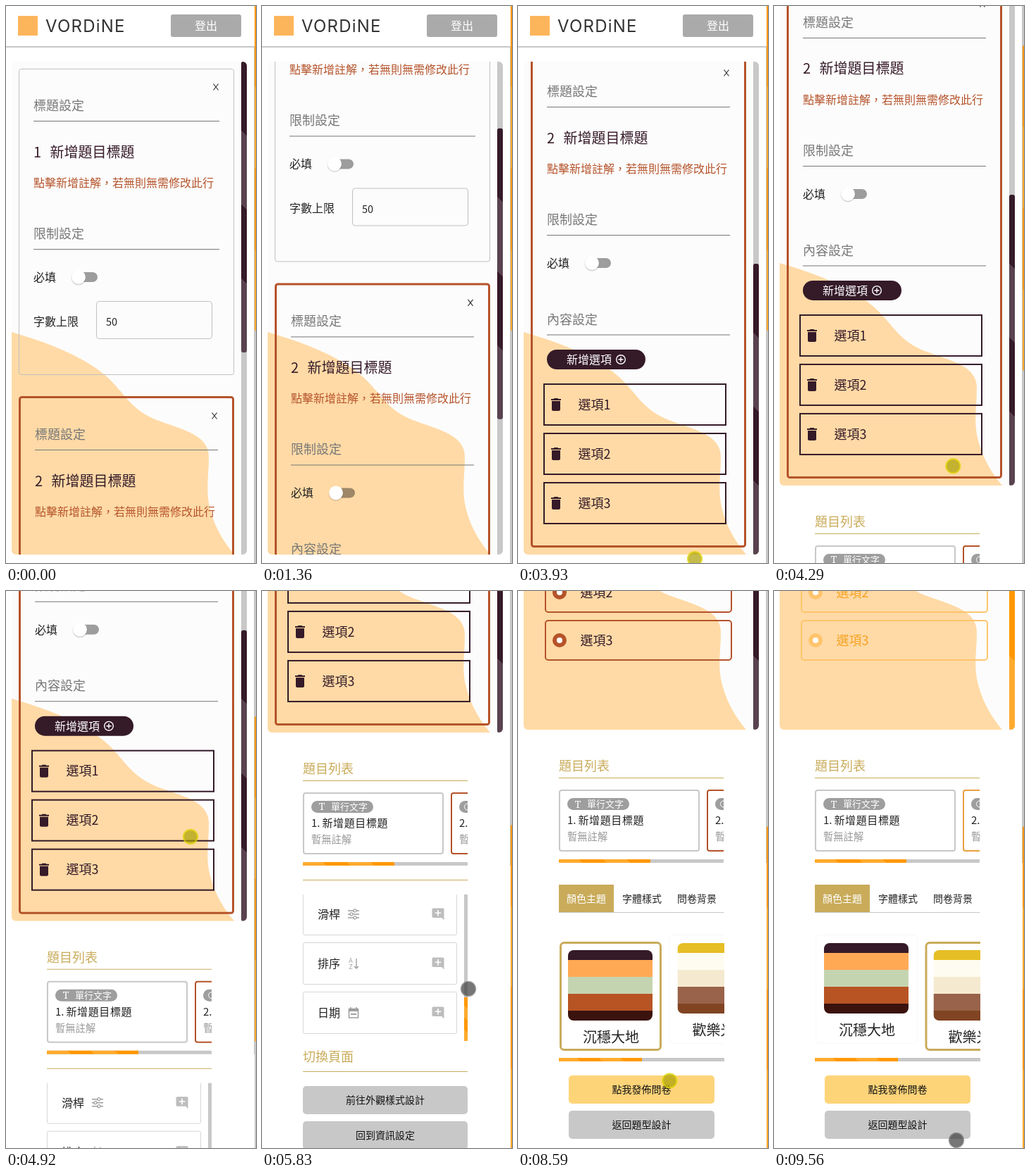
Animation of 355x791 px, one loop 9620 ms. Source, as an HTML page:

```html
<!DOCTYPE html>
<html lang="zh-Hant">
<head>
<meta charset="utf-8">
<title>問卷編輯</title>
<style>
html, body { margin: 0; width: 100%; height: 100%; overflow: hidden; background: #fff; }
svg { display: block; width: 355px; height: 791px; --main: #351a28; --edge: #b5532a; --opt: #b5532a; --label: #351a28; }
text { font-family: "Noto Sans CJK TC", "Noto Sans CJK", "Noto Sans", sans-serif; white-space: pre; }
</style>
</head>
<body>
<svg id="stage" viewBox="0 0 355 791"></svg>
<script>
const LOOP = 9620;
const DARK = '#351a28', BROWN = '#b5532a', GOLD = '#c9ab5a', GRAY = '#c8c8c8', ORANGE = '#ff9800', MID = '#777';
const stage = document.getElementById('stage');
const $ = id => document.getElementById(id);

// Shape helpers; text is placed by its vertical centre.
const rect = (x, y, w, h, fill, r = 0, more = '') =>
  `<rect x="${x}" y="${y}" width="${w}" height="${h}" rx="${r}" fill="${fill}" ${more}/>`;
const frame = (x, y, w, h, color, sw = 1, r = 0, fill = 'none') =>
  rect(x + sw / 2, y + sw / 2, w - sw, h - sw, fill, r, `stroke="${color}" stroke-width="${sw}"`);
const text = (x, cy, str, size, fill = '#222', more = '') =>
  `<text x="${x}" y="${cy + size * 0.375}" font-size="${size}" fill="${fill}" ${more}>${str}</text>`;
const mid = (x, cy, str, size, fill, more = '') => text(x, cy, str, size, fill, 'text-anchor="middle" ' + more);
const path = (d, stroke, sw = 1.4) => `<path d="${d}" fill="none" stroke="${stroke}" stroke-width="${sw}"/>`;
const hline = (x1, x2, y, color) => rect(x1, y, x2 - x1, 1, color);
const clip = (id, x, y, w, h, r = 0) => `<clipPath id="${id}">${rect(x, y, w, h, '#000', r)}</clipPath>`;
const clipped = (id, body) => `<g clip-path="url(#${id})">${body}</g>`;
const group = (id, body) => `<g id="${id}">${body}</g>`;

// Scrollbar thumb with four 45 degree stripes.
let thumbs = 0;
function thumb(x, y, w, h, fill, r = 0) {
  const id = 'stripe' + thumbs++, len = (w + h) / 2;
  const stops = [0, 1, 2, 3].map(i => [i, i + 1].map(k =>
    `<stop offset="${k / 4}" stop-color="#fff" stop-opacity="${i % 2 ? 0 : 0.18}"/>`).join('')).join('');
  return `<linearGradient id="${id}" gradientUnits="userSpaceOnUse" x1="${x}" y1="${y + h}" x2="${x + len}" y2="${y + h - len}">${stops}</linearGradient>`
    + rect(x, y, w, h, fill, r) + rect(x, y, w, h, `url(#${id})`, r);
}

const cross = (x, y) => path(`M${x - 3.5} ${y - 4.5}l7 9m0 -9l-7 9`, '#333', 1.2);
const trash = (x, y) => `<path transform="translate(${x - 12} ${y - 12})" fill="${DARK}" d="M6 19c0 1.1.9 2 2 2h8c1.1 0 2-.9 2-2V7H6zM19 4h-3.5l-1-1h-5l-1 1H5v2h14z"/>`;
const addIcon = (x, y) => `<path transform="translate(${x - 10.2} ${y - 10.2}) scale(.85)" fill="#bdbdbd" d="M22 4c0-1.1-.9-2-2-2H4c-1.1 0-2 .9-2 2v12c0 1.1.9 2 2 2h14l4 4zm-5 7h-4v4h-2v-4H7V9h4V5h2v4h4z"/>`;
const toggle = (x, y) => rect(x - 7, y - 7, 34, 14, 'rgba(0,0,0,.38)', 7)
  + `<circle cx="${x}" cy="${y + 1}" r="10.5" fill="rgba(0,0,0,.16)"/><circle cx="${x}" cy="${y}" r="10" fill="#fff"/>`;

// Shared upper half of a question card.
function question(x, right, top, n, xx) {
  return cross(xx, top) + text(x, top + 26, '標題設定', 18, MID) + hline(x, right, top + 48, MID)
    + text(x, top + 92, n, 20, DARK) + text(x + 23.5, top + 92, '新增題目標題', 20, DARK)
    + text(x, top + 136, '點擊新增註解，若無則無需修改此行', 16, BROWN)
    + text(x, top + 208, '限制設定', 18, MID) + hline(x, right, top + 230, MID)
    + text(x, top + 270, '必填', 16) + toggle(x + 64, top + 270);
}

function form() {
  const options = [1, 2, 3].map(i => {
    const y = 953 + i * 70;
    return frame(36, y, 260, 60, DARK, 2) + trash(54, y + 30) + text(85.5, y + 30, '選項' + i, 18, DARK);
  }).join('');
  return frame(18, 89, 306, 435, '#c0c0c0', 1, 3) + question(39, 303, 115, 1, 298)
    + text(39, 448, '字數上限', 16) + frame(128, 419, 165, 54, '#c0c0c0', 1, 4) + text(142, 449, '50', 14.5)
    + frame(18, 554, 306, 702, BROWN, 3, 3) + question(41, 301, 582, 2, 296)
    + text(41, 932, '內容設定', 18, MID) + hline(41, 301, 953.5, MID)
    + rect(41, 975, 140, 28, DARK, 14) + text(69, 989, '新增選項', 16, '#fff', 'font-weight="500"')
    + `<circle cx="146" cy="989" r="6.3" fill="none" stroke="#fff" stroke-width="1.4"/>` + path('M142.5 989h7m-3.5 -3.5v7', '#fff')
    + options;
}

const preview = () => [1, 2, 3].map(i => {
  const y = 419 + i * 68;
  return frame(38, y, 266, 58, 'var(--opt)', 2, 4)
    + `<circle cx="59" cy="${y + 29}" r="7" fill="#fff" stroke="var(--opt)" stroke-width="6"/>`
    + text(88.5, y + 29, '選項' + i, 18, 'var(--label)');
}).join('');

const blob = `<path fill="#ffdaa6" d="M8 463C60 478 118 500 150 533C172 556 180 574 214 588C248 601 288 608 288 640C288 668 283 690 290 715C297 742 310 762 324 779H8Z"/>`;

const header = rect(17, 14, 28, 28, '#fdb55c')
  + `<text x="56" y="36.5" font-size="24" fill="#333" letter-spacing="1.2" style="font-family:Inter,sans-serif">VORDiNE</text>`
  + rect(234, 12, 100, 32, '#aaa', 3) + mid(284, 28, '登出', 16, '#fff', 'font-weight="500"')
  + rect(0, 57, 353, 2, GRAY) + rect(352, 58, 2, 910, GRAY);

const tee = (x, y, color) => `<text x="${x}" y="${y + 5}" font-size="14" fill="${color}" text-anchor="middle" style="font-family:'Noto Serif',serif">T</text>`;

function card(x, n, color, kind) {
  return frame(x, 864, 200, 88, color, 2, 3) + rect(x + 12, 876, 88, 17, '#9e9e9e', 8.5)
    + (kind ? `<circle cx="${x + 24}" cy="884.5" r="4.5" fill="none" stroke="#fff"/>` : tee(x + 27, 884.5, '#fff'))
    + text(x + 40, 884.5, kind || '單行文字', 13, '#fff', 'font-weight="500"')
    + text(x + 12, 907.5, n + '.', 15) + text(x + 27.5, 907.5, '新增題目標題', 15, '#222', 'letter-spacing=".6"')
    + text(x + 12, 931, '暫無註解', 14.3, '#999');
}

const overview = text(58, 830.5, '題目列表', 18, GOLD) + hline(58, 292, 847, GOLD)
  + clipped('cards', card(58, 1, GRAY) + card(268, 2, 'var(--edge)', '單選'))
  + rect(58, 963, 234, 5, GRAY) + thumb(58, 963, 130, 5, ORANGE);

const glyphs = {
  sliders: x => path(`M${x - 8} -5h8m4 0h4M${x - 8} 0h3m4 0h9M${x - 8} 5h8m4 0h4`, '#9e9e9e')
    + [[2, -5], [-3, 0], [2, 5]].map(([a, b]) => `<circle cx="${x + a}" cy="${b}" r="2" fill="none" stroke="#9e9e9e" stroke-width="1.2"/>`).join(''),
  sort: x => mid(x - 4, -4, 'A', 9, '#9e9e9e') + mid(x - 4, 5, 'Z', 9, '#9e9e9e') + path(`M${x + 4} -7v14m-3 -3l3 3l3 -3`, '#9e9e9e'),
  date: x => path(`M${x - 6.5} -5.5h13v12.5h-13zM${x - 4} -8v3m8 -3v3`, '#9e9e9e', 1.6) + rect(x - 6, -5, 12, 3, '#9e9e9e') + path(`M${x - 4} 2h8`, '#9e9e9e', 2),
  tee: x => tee(x, 0, '#9e9e9e'),
  lines: x => path(`M${x - 8.5} -6h17v12h-17zM${x - 6} -2.5h12m-12 2.5h12m-12 2.5h8`, '#9e9e9e', 1.2),
  quote: x => rect(x - 6, -7, 12, 10, '#9e9e9e', 3) + mid(x, -.5, '”', 11, '#fff') + path(`M${x - 7} 7h14M${x - 5} 4.5h6`, '#9e9e9e'),
  ring: x => `<circle cx="${x}" cy="0" r="6" fill="none" stroke="#9e9e9e" stroke-width="1.4"/>`
};
const kinds = [['單行文字', 'tee'], ['多行文字', 'lines'], ['引言', 'quote'], ['單選', 'ring'], ['多選', 'ring'],
  ['下拉選單', 'lines'], ['量表', 'ring'], ['滑桿', 'sliders'], ['排序', 'sort'], ['日期', 'date']];
const rows = kinds.map(([name, icon], i) => `<g transform="translate(0 ${1039 + i * 70})">`
  + frame(58, -30, 219, 60, '#d6d6d6', 1, 2, '#fff') + text(79, 0, name, 16)
  + glyphs[icon](98 + name.length * 16) + addIcon(250, 0) + '</g>').join('');

const button = (x, y, w, label, fill = GRAY) => rect(x, y, w, 40, fill, 5) + mid(x + w / 2, y + 20, label, 14, '#111');

const build = hline(58, 292, 988, GOLD)
  + clipped('list', group('rows', rows)) + rect(287, 1009, 5, 208, GRAY) + group('rowThumb', thumb(287, 1009, 5, 62, ORANGE))
  + text(58, 1239, '切換頁面', 18, GOLD) + hline(58, 292, 1260, GOLD)
  + button(58, 1281, 234, '前往外觀樣式設計') + button(58, 1331, 234, '回到資訊設定');

function tile(id, x, name, colors) {
  const edges = [0, 14, 38, 62, 86, 100];
  const bands = colors.map((c, i) => rect(x + 12, 1082 + edges[i], 120, edges[i + 1] - edges[i], c)).join('');
  return group(id, clip(id + 'Clip', x + 12, 1082, 120, 100, 8) + frame(x, 1070, 145, 155, '#f8f8f8', 1, 5, '#fff')
    + `<g id="${id}Edge">${frame(x, 1070, 145, 155, GOLD, 3, 5)}</g>`
    + clipped(id + 'Clip', bands) + mid(x + 73, 1205, name, 20, '#222'));
}

const style = rect(58, 999, 78, 39, GOLD) + hline(58, 292, 1038, GRAY)
  + text(69, 1019, '顏色主題', 14, '#fff', 'font-weight="500"') + text(148, 1019, '字體樣式', 14) + text(226, 1019, '問卷背景', 14)
  + clipped('tiles', tile('earth', 59, '沉穩大地', [DARK, '#ffa955', '#c5d4b0', '#b85424', '#3b120e'])
    + tile('joy', 214.5, '歡樂光彩', ['#e6be25', '#fefcf0', '#f5ead0', '#99624a', '#804422']))
  + rect(58, 1245, 235, 5, GRAY) + thumb(58, 1245, 118, 5, ORANGE)
  + button(72, 1270, 207, '點我發佈問卷', '#fed479') + button(72, 1320, 207, '返回題型設計');

stage.innerHTML = '<defs>' + clip('panel', 8, 79, 334, 700, 6) + clip('cards', 58, 860, 234, 96)
  + clip('list', 58, 1009, 234, 208) + clip('tiles', 58, 1060, 235, 180) + '</defs>'
  + rect(0, 0, 355, 791, '#fff') + rect(353, 0, 2, 791, GRAY)
  + group('page', header
    + clipped('panel', rect(8, 79, 334, 700, '#fcfcfc') + blob + group('form', form()) + group('preview', preview())
      + rect(334, 79, 8, 700, GRAY) + group('formThumb', thumb(334, 79, 8, 413, 'var(--main)', 3)))
    + overview + group('build', build) + group('style', style))
  + group('pageThumb', thumb(353, 0, 2, 461, ORANGE))
  + '<circle id="cursor" r="10" stroke-width="2.5"/>';

// Piecewise interpolation over [time, value] keys.
const linear = u => u, smooth = u => u * u * (3 - 2 * u);
function along(t, keys, ease = linear) {
  if (t <= keys[0][0]) return keys[0][1];
  for (let i = 1; i < keys.length; i++) {
    const [t0, a] = keys[i - 1], [t1, b] = keys[i];
    if (t < t1) return a + (b - a) * ease((t - t0) / (t1 - t0));
  }
  return keys[keys.length - 1][1];
}
const rgb = hex => [1, 3, 5].map(i => parseInt(hex.slice(i, i + 2), 16));
const mix = (a, b, k) => `rgb(${rgb(a).map((v, i) => Math.round(v + (rgb(b)[i] - v) * k))})`;

const SWITCH = 8050;
const formKeys = [[390, 0], [2210, 301], [3400, 487]];
const pageKeys = [[4000, 0], [4920, 310], [5830, 578], [5950, 583]];
const rowKeys = [[6430, 492], [7440, 23], [7520, 0]];
const path2d = [[1450, 369, 588], [2210, 320, 664], [2800, 342, 722], [3450, 330, 766], [3930, 251, 785],
  [4920, 262, 349], [5830, 293, 565], [6400, 268, 690], [6900, 217, 537], [7440, 217, 537], [7900, 205, 722],
  [8420, 205, 722], [9050, 262, 575], [9340, 262, 575], [9560, 259, 780]];
const xKeys = path2d.map(([t, x]) => [t, x]), yKeys = path2d.map(([t, , y]) => [t, y]);
const presses = [[0, 3480], [5650, 6150], [7960, 8090], [9110, 9230], [9520, LOOP]];
const themes = { main: [DARK, ORANGE], edge: [BROWN, '#e8a040'], opt: [BROWN, '#ffc46c'], label: [DARK, '#f6a120'] };

const shift = (id, y) => $(id).setAttribute('transform', `translate(0 ${y.toFixed(2)})`);
const show = (id, on) => $(id).setAttribute('display', on ? 'inline' : 'none');

function draw(t) {
  const styled = t >= SWITCH;
  const page = styled ? 582 : along(t, pageKeys), inner = along(t, formKeys), list = along(t, rowKeys);
  shift('page', -page);
  shift('pageThumb', page * 0.575);
  shift('form', -inner);
  shift('formThumb', inner * 287 / 487);
  shift('rows', -list);
  shift('rowThumb', list * 146 / 492);
  for (const id of ['form', 'build']) show(id, !styled);
  for (const id of ['preview', 'style']) show(id, styled);

  const k = along(t, [[9150, 0], [9480, 1]], smooth);
  for (const name in themes) stage.style.setProperty('--' + name, mix(...themes[name], k));
  shift('earth', 10 * (1 - k));
  shift('joy', 10 * k);
  $('earthEdge').setAttribute('opacity', 1 - k);
  $('joyEdge').setAttribute('opacity', k);

  const down = presses.some(([a, b]) => t >= a && t < b), cursor = $('cursor');
  cursor.setAttribute('cx', along(t, xKeys, smooth));
  cursor.setAttribute('cy', along(t, yKeys, smooth));
  cursor.setAttribute('fill', down ? 'rgba(60,60,60,.7)' : 'rgba(170,160,0,.7)');
  cursor.setAttribute('stroke', down ? 'rgba(110,110,110,.6)' : 'rgba(225,215,0,.65)');
}

const start = performance.now();
function tick() {
  draw((performance.now() - start) % LOOP);
  requestAnimationFrame(tick);
}
tick();
</script>
</body>
</html>
```
